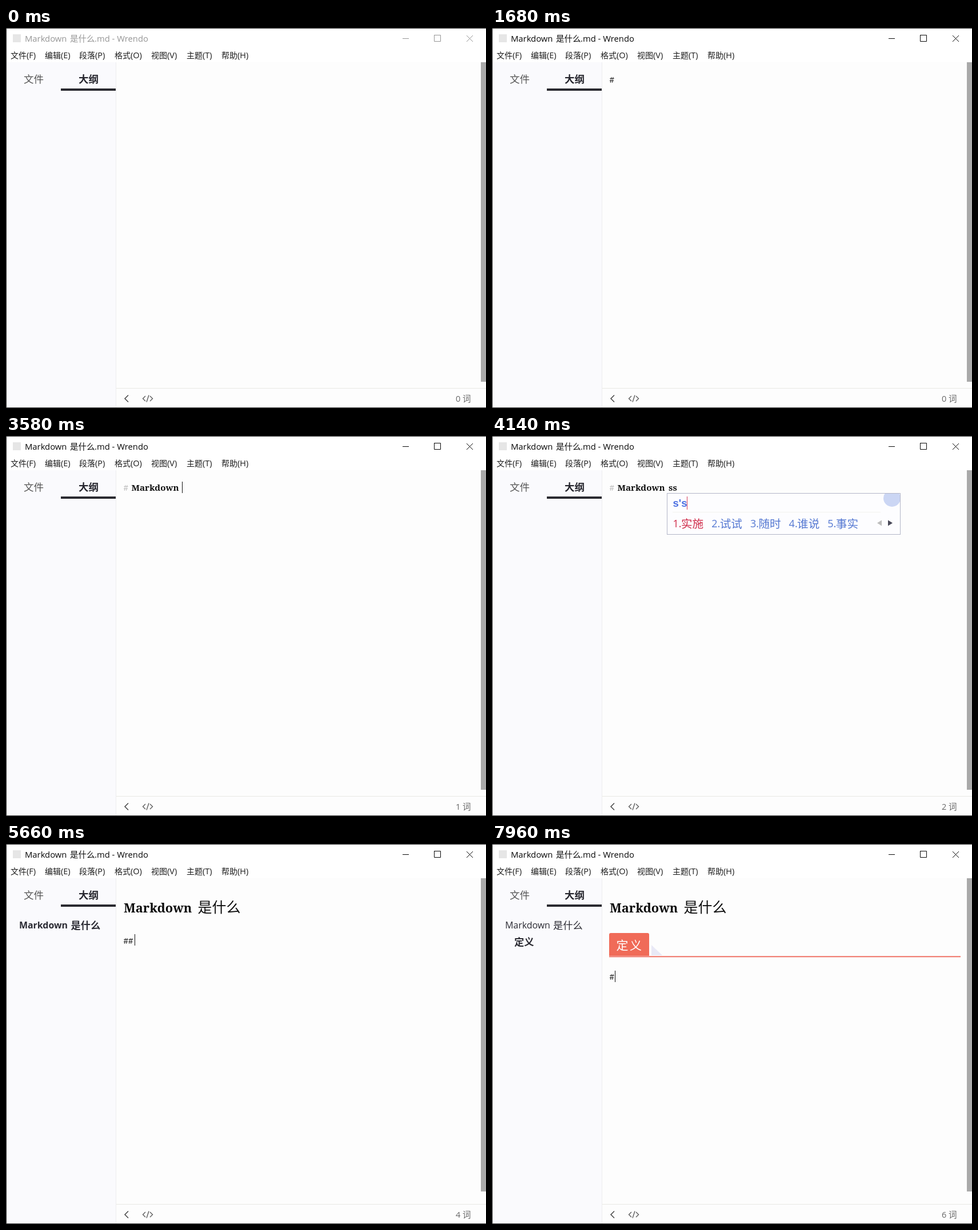
These frames come from a looping animation (840 px wide and 666 px high, 8000 ms). An HTML page with a canvas:

```html
<!DOCTYPE html>
<html lang="zh-CN">
<head>
<meta charset="utf-8">
<title>Markdown</title>
<style>
html, body { margin: 0; width: 100%; height: 100%; overflow: hidden; background: #fff; }
canvas { display: block; }
</style>
</head>
<body>
<canvas id="stage" width="840" height="666"></canvas>
<script>
const ctx = document.getElementById('stage').getContext('2d');
const LOOP = 8000;

const CJK = '"Noto Sans CJK SC", "Noto Sans CJK", sans-serif';
const SANS = '"Open Sans", "Noto Sans", ' + CJK;
const SERIF = '"Noto Serif", "Noto Sans CJK SC", serif';
const ARIAL = '"Liberation Sans", sans-serif';
const BODY = `15.2px ${SERIF}`;
const BODY_BOLD = `bold 15.2px ${SERIF}`;
const BODY_CJK = `17px ${CJK}`;

// Time tables: [start in ms, value...]; the last row that has begun applies.
const typed = [
  [0, ''], [1980, 'M'], [2160, 'Ma'], [2400, 'Mar'], [2540, 'Mark'],
  [2740, 'Markd'], [2860, 'Markdo'], [2980, 'Markdow'], [3100, 'Markdown'], [3380, ''],
  [3880, 's'], [4100, 'ss'], [4320, 'ssm'], [4660, ''],
  [6280, 'd'], [6480, 'dy'], [7020, '']
];
const carets = [
  [0], [60, 205, 80], [500], [820, 205, 80], [1130, 215, 80], [1370, 219, 80], [1680],
  [3400, 305, 80], [3570, 308, 80], [3880], [4700, 361, 80], [5020, 205, 158],
  [5560, 216, 158], [5640, 225, 158], [5960, 229, 158], [6280],
  [7060, 264, 158], [7320, 205, 222], [7940, 215, 222]
];
const wordCounts = [[0, 0], [3400, 1], [4100, 2], [4700, 4], [7060, 6]];
const candidates = {
  s: '是 说 算 送 上',
  ss: '实施 试试 随时 谁说 事实',
  ssm: '是什么 说什么 算什么 送什么 上什么',
  d: '的 到 对 都 大',
  dy: '对于 定义 党员 对应 调研'
};

const at = (table, t) => table.filter(row => row[0] <= t).pop();

function box(x, y, w, h, color) {
  ctx.fillStyle = color;
  ctx.fillRect(x, y, w, h);
}

function text(str, x, y, font, color) {
  ctx.font = font;
  ctx.fillStyle = color;
  ctx.fillText(str, x, y);
  return x + ctx.measureText(str).width;
}

function lines(color, width, ...paths) {
  ctx.strokeStyle = color;
  ctx.lineWidth = width;
  ctx.beginPath();
  for (const path of paths)
    path.forEach(([x, y], i) => i ? ctx.lineTo(x, y) : ctx.moveTo(x, y));
  ctx.stroke();
}

function triangle(color, ...points) {
  ctx.fillStyle = color;
  ctx.beginPath();
  points.forEach(p => ctx.lineTo(...p));
  ctx.fill();
}

function drawTitleBar(t) {
  const focus = Math.min(1, Math.max(0, (t - 20) / 220));
  const gray = Math.round(150 - 140 * focus);
  const color = `rgb(${gray},${gray},${gray})`;
  box(12, 11, 14, 14, '#e6e6e6');
  const latin = `14.8px ${SANS}`;
  text('Markdown', 33, 24, latin, color);
  text('是什么', 112, 24, `14.5px ${CJK}`, color);
  text('.md - Wrendo', 155, 24, latin, color);
  lines(color, 1, [[694, 18.5], [705, 18.5]],
    [[749.5, 12.5], [760.5, 12.5], [760.5, 23.5], [749.5, 23.5], [749.5, 12]],
    [[806, 13], [817, 24]], [[817, 13], [806, 24]]);
}

function drawMenu() {
  const items = [['文件(F)', 8], ['编辑(E)', 68], ['段落(P)', 128], ['格式(O)', 190],
    ['视图(V)', 254], ['主题(T)', 316], ['帮助(H)', 377]];
  for (const [label, x] of items) {
    text(label.slice(0, 2), x, 53, `14px ${CJK}`, '#1c1c1c');
    text(label.slice(2), x + 28, 53, `14.5px ${SANS}`, '#1c1c1c');
  }
}

function drawSidebar(t) {
  box(1, 60, 191, 605, '#fafafd');
  box(192, 60, 1, 605, '#ededf0');
  text('文件', 31, 95.5, `17.5px ${CJK}`, '#555');
  text('大纲', 127, 96, `bold 17.5px ${CJK}`, '#25252d');
  box(96, 106, 96, 4, '#2a2a30');
  if (t < 5260) return;
  const nested = t >= 7560;
  const weight = nested ? '' : 'bold ';
  text('Markdown', 23, 148, `${weight}15.9px ${SANS}`, '#2b2b33');
  text('是什么', nested ? 107 : 113.5, 148.5, `${weight}17.2px ${CJK}`, '#2b2b33');
  if (nested) text('定义', 39, 177.5, `bold 17.2px ${CJK}`, '#2b2b33');
}

function drawFooter(t) {
  box(193, 631, 638, 1, '#e9e9e4');
  box(831, 631, 9, 1, '#e9e9e4');
  lines('#444', 1.5, [[214, 643.5], [208, 649.5], [214, 655.5]]);
  lines('#555', 1.3, [[244, 645], [239.5, 649.5], [244, 654]],
    [[252, 645], [256.5, 649.5], [252, 654]], [[250, 643.5], [246, 655.5]]);
  text(at(wordCounts, t)[1], 787, 654.5, `14.5px ${SANS}`, '#666');
  text('词', 799, 654.5, `14.5px ${CJK}`, '#666');
  box(831, 60, 9, t < 5260 ? 560 : 549, '#a9a9a9');
}

function drawFirstLine(t, input) {
  if (t < 1130) return;
  if (t < 3400) {
    const end = text('#', 205.5, 96, BODY, '#111');
    const word = t >= 3380 ? 'Markdown' : input;
    if (word) text(word, end + 4, 96, BODY, '#111');
    return;
  }
  text('#', 205.5, 96, BODY, '#b8b8b8');
  text('Markdown', 219.5, 96, BODY_BOLD, '#111');
  if (input) text(input, 309, 96, BODY_BOLD, '#111');
  else if (t >= 4660) text('是什么', 309, 96, BODY_CJK, '#111');
}

function drawTag() {
  ctx.fillStyle = '#f06b58';
  ctx.beginPath();
  ctx.roundRect(205, 156, 70, 40, [3, 3, 0, 0]);
  ctx.fill();
  text('定', 217.5, 185, `21px ${CJK}`, '#fff');
  text('义', 241, 185, `21px ${CJK}`, '#fff');
  triangle('#e9e9f6', [279, 177], [279, 195], [298, 195]);
  box(205, 196.5, 615, 1.8, '#ee6556');
}

function drawDocument(t, input) {
  if (t < 5020) {
    drawFirstLine(t, input);
  } else {
    text('Markdown', 206, 119.5, `bold 21.8px ${SERIF}`, '#0c0c0c');
    text('是什么', 335.5, 120, `500 25px ${CJK}`, '#0c0c0c');
    if (t >= 7320) {
      drawTag();
      if (t >= 7920) text('#', 205.5, 237.5, BODY, '#111');
    } else if (t >= 5560) {
      text(t < 5640 ? '#' : '##', 205.5, 174.5, BODY, '#111');
      if (input) text(input, 230, 174.5, BODY, '#111');
      else if (t >= 7020) text('定义', 230, 174.5, BODY_CJK, '#111');
    }
  }
  const [, x, y] = at(carets, t);
  if (x) box(x, y, 1, 20, '#111');
}

function drawInputPanel(t, input) {
  if (!input) return;
  const words = candidates[input] ? candidates[input].split(' ') : [];
  const [x, y] = t < 3380 ? [216, 100] : t < 5000 ? [306, 100] : [227, 179];
  const stride = words.length ? 29.3 + 19.2 * words[0].length : 0;
  const w = words.length ? Math.round(stride * 5 + 69) : 241;
  const h = words.length ? 72 : 57;
  const right = x + w;

  ctx.save();
  ctx.beginPath();
  ctx.rect(x, y, w, h);
  ctx.clip();
  box(x, y, w, h, '#fdfdff');
  ctx.fillStyle = '#cbd6f4';
  ctx.beginPath();
  ctx.arc(right - 14, y + 9, 15, 0, Math.PI * 2);
  ctx.fill();
  box(x + 10, y + 33, w - 44, 1, '#f3f3ee');

  const shown = words.length ? [...input].join("'") : input;
  const end = text(shown, x + 10.5, y + 24, `bold 18.5px ${ARIAL}`, '#4c70e2');
  box(Math.round(end), y + 6, 1, 23, '#d4405c');

  words.forEach((word, i) => {
    const color = i ? '#5578d2' : '#d02c4a';
    const left = x + 10.5 + i * stride;
    text(`${i + 1}.`, left, y + 60, `18px ${SANS}`, color);
    text(word, left + 14.5, y + 60.5, `300 19.6px ${CJK}`, color);
  });
  if (words.length) {
    const mid = y + 52.5;
    triangle('#bdbdbd', [right - 32, mid - 5], [right - 32, mid + 5], [right - 40, mid]);
    triangle('#484858', [right - 21, mid - 5], [right - 21, mid + 5], [right - 13, mid]);
  }
  ctx.restore();
  ctx.strokeStyle = '#b3b6c8';
  ctx.lineWidth = 1;
  ctx.strokeRect(x + 0.5, y + 0.5, w, h);
}

function draw(t) {
  const input = at(typed, t)[1];
  box(0, 0, 840, 666, '#fff');
  box(193, 60, 647, 605, '#fdfdfd');
  drawTitleBar(t);
  drawMenu();
  drawSidebar(t);
  drawFooter(t);
  drawDocument(t, input);
  drawInputPanel(t, input);
  box(0, 0, 840, 1, '#2c2c2c');
  box(0, 0, 1, 666, '#2c2c2c');
  box(0, 665, 840, 1, '#2c2c2c');
}

const start = performance.now();
function tick() {
  draw((performance.now() - start) % LOOP);
  requestAnimationFrame(tick);
}
tick();
</script>
</body>
</html>
```
